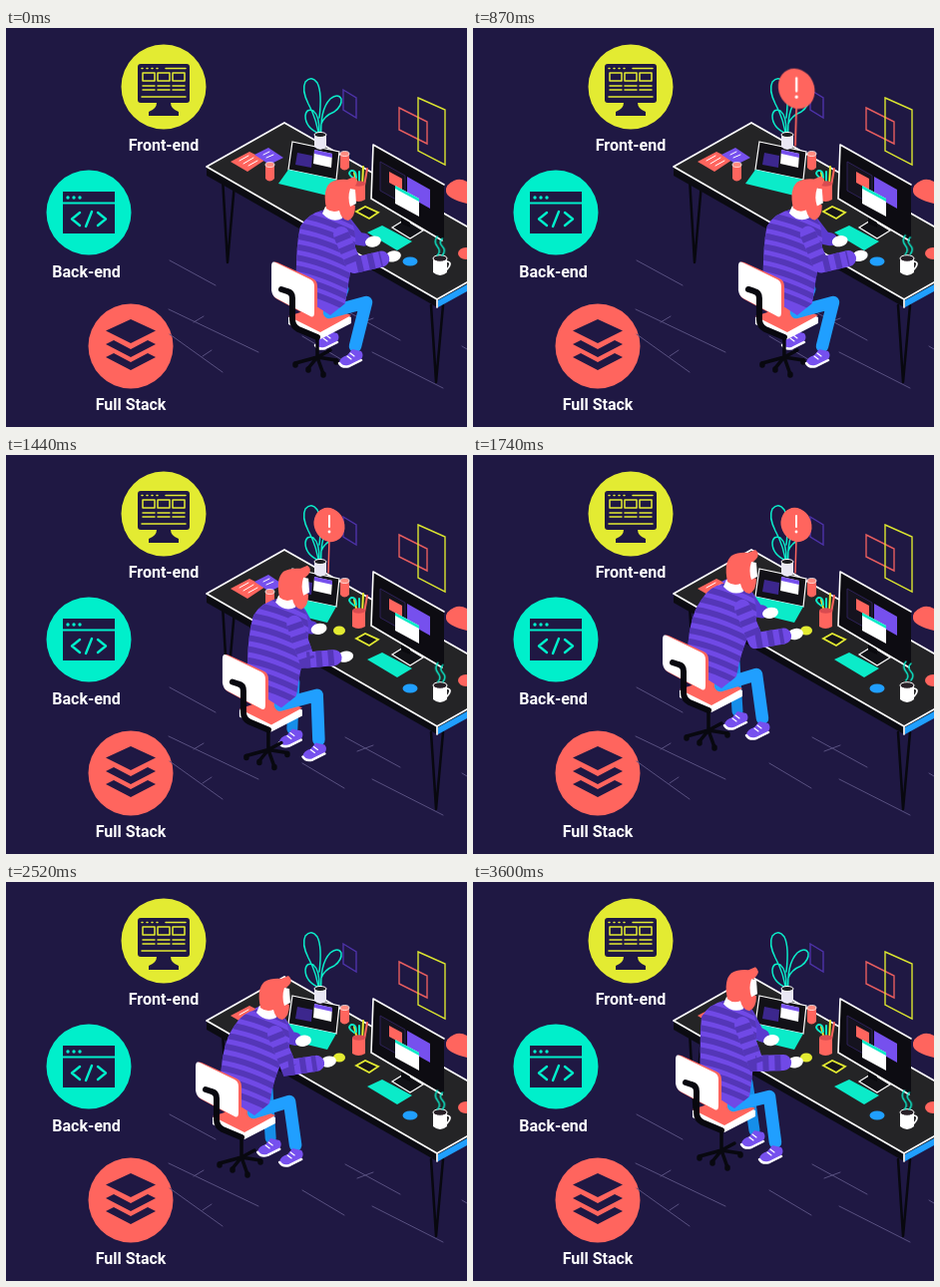
An HTML page for the animation above (3.63 s loop, 462 by 400 pixels).

```html
<!DOCTYPE html>
<html lang="en">
<head>
<meta charset="utf-8">
<title>Developer roles</title>
<style>
html, body { margin: 0; width: 100%; height: 100%; overflow: hidden; background: #1f1843; }
svg { display: block; width: 462px; height: 400px; }
text { font: 700 16px Roboto, Arial, sans-serif; fill: #fff; text-anchor: middle; }
.line { fill: none; stroke-linecap: round; stroke-linejoin: round; }
#alert { transform-origin: 323px 120px; animation: alert 3630ms infinite; }
.steam { animation: sway 605ms ease-in-out infinite alternate; }
@keyframes alert {
  0%, 18% { transform: scale(0); opacity: 1; }
  23% { transform: scale(1.28); }
  28% { transform: scale(.95); }
  32%, 57% { transform: none; opacity: 1; }
  59.5% { opacity: .3; }
  61%, 100% { transform: none; opacity: 0; }
}
@keyframes sway {
  from { transform: translate(-.7px, 1px); }
  to { transform: translate(.8px, -1px); }
}
</style>
</head>
<body>
<svg viewBox="0 0 462 400">
  <defs>
    <clipPath id="torsoClip"><path id="torsoShape"/></clipPath>
    <g id="shoe">
      <path d="M-12 4Q-11-1-4-3L1-9 10-7Q13-3 10 1L-2 8Q-11 10-12 4Z" fill="#7650ee"/>
      <path class="line" d="M-12 5Q-9 10-2 8L10 2" stroke="#fff" stroke-width="2.5"/>
      <path class="line" d="M-4-2l4 3M-1-5l4 3" stroke="#fff" stroke-width="1.2"/>
    </g>
    <ellipse id="hand" rx="8" ry="5.5" fill="#fff" transform="rotate(-12)"/>
  </defs>

  <rect width="462" height="400" fill="#1f1843"/>

  <!-- Role icons -->
  <circle cx="158" cy="59" r="42.5" fill="#e3eb32"/>
  <g fill="#1f1843">
    <rect x="132" y="36" width="52" height="39" rx="3"/>
    <path d="M151 75h14q0 6 8 9v4h-30v-4q8-3 8-9z"/>
  </g>
  <g class="line" stroke="#e3eb32" stroke-width="1.5">
    <path d="M136 40.5h1M141 40.5h1M146 40.5h1M151 40.5h1M160 40.5h20M136 69h44"/>
    <path d="M137 45h12v8h-12zM152 45h12v8h-12zM167 45h12v8h-12zM137 58h12M152 58h12M167 58h12M137 62h12M152 62h12M167 62h12"/>
  </g>
  <circle cx="83" cy="185" r="42.5" fill="#00efcb"/>
  <path d="M57 164h52v42H57z" fill="#1f1843"/>
  <path d="M57 175.5h52" stroke="#00efcb" stroke-width="2"/>
  <g fill="#00efcb"><circle cx="62" cy="170" r="1.7"/><circle cx="68" cy="170" r="1.7"/><circle cx="74" cy="170" r="1.7"/></g>
  <path class="line" d="M74 185l-8 6.5 8 6.5M92 185l8 6.5-8 6.5M86 184l-6 15" stroke="#00efcb" stroke-width="2.4"/>
  <circle cx="125" cy="319" r="42.5" fill="#ff655e"/>
  <g fill="#1f1843">
    <path d="M125 292l25 11.5-25 12.5-25-12.5z"/>
    <path id="layer" d="M100 317l8-4 17 9 17-9 8 4-25 13z"/>
    <use href="#layer" y="13"/>
  </g>
  <text x="158" y="123">Front-end</text>
  <text x="80.5" y="250">Back-end</text>
  <text x="125" y="383">Full Stack</text>

  <!-- Floor and wall -->
  <path class="line" d="M164 233l46 25M163 282l90 43M188 295l10-6M164 307l53 38M197 329l9-6M297 309l42 25M340 283l55 30M352 297l16-6M367 325l71 36M457 319l5 3" stroke="#585080" stroke-width="1"/>
  <g fill="none" stroke-width="1.4">
    <path d="M338 62l13 8v20l-13-8z" stroke="#4d32a8"/>
    <path d="M394 80l28 14v22l-28-14z" stroke="#e65d5e"/>
    <path d="M413 70l27 12v55l-27-14z" stroke="#dbe52f"/>
  </g>
  <path d="M462 154q-7-4-13-1-9 4-8 11 1 7 21 12z" fill="#ff655e"/>

  <!-- Desk -->
  <g class="line" stroke="#08080f" stroke-width="2.5">
    <path d="M217 150l5 85 7-79M426 278l5 77 7-77"/>
  </g>
  <path d="M201 139L279 95 462 199V263L432 280 201 148z" fill="#0b0b12"/>
  <path d="M201 139L279 95 462 199V255L432 272z" fill="#242426"/>
  <path d="M433 273l29-16v7l-29 16z" fill="#209fff"/>
  <path class="line" d="M279 95L201 139 432 272 462 255M279 95l183 104M432 272v8" stroke="#fff" stroke-width="1.7"/>

  <!-- Papers and cans -->
  <path d="M225 134l19-10 16 8-18 12z" fill="#ff655e"/>
  <path d="M249 127l14-7 15 10-14 7z" fill="#7650ee"/>
  <path class="line" d="M234 133l9-5M238 136l10-6M243 138l9-5M258 127l6-3M261 130l7-3" stroke="#fff" stroke-width="1"/>
  <g id="can"><path d="M260 137v14q4 5 9 0v-14z" fill="#ff655e"/><ellipse cx="264.5" cy="137" rx="4.5" ry="2.5" fill="#ff8b80" stroke="#fff" stroke-width=".7"/></g>
  <use href="#can" x="75" y="-11"/>

  <!-- Laptop -->
  <path d="M287 114l47 10-3 28-48-10z" fill="#121117" stroke="#fff" stroke-width="1.2"/>
  <path d="M283 142l48 10-9 16-49-12z" fill="#0bebc9"/>
  <path d="M292 125l15 3-1 12-16-3z" fill="#3c278d"/>
  <path d="M309 122l18 4-1 14-18-4z" fill="#fff"/>
  <path d="M309 122l18 4v4l-18-4z" fill="#7650ee"/>

  <!-- Plant -->
  <path class="line" d="M314 112Q312 92 303 76 296 62 300 54 306 47 312 55 317 65 314 90M316 112Q314 82 325 71 333 65 336 71 337 78 329 84 319 88 316 96M314 106Q300 100 300 88 301 80 308 83 314 88 314 104" stroke="#0bebc9" stroke-width="1.5"/>
  <path d="M309 107v12q6 6 12 0v-12z" fill="#e9e7f4"/><ellipse cx="315" cy="107" rx="6" ry="2.5" fill="#1d1c21" stroke="#fff"/>

  <!-- Monitor -->
  <path d="M387 200l13-8 18 11-13 8z" fill="#111116" stroke="#fff" stroke-width="1.2"/>
  <path d="M396 180h9v20l-9-4z" fill="#09090e"/>
  <path d="M368 117l71 40v56l-73-42z" fill="#0d0c12"/>
  <path class="line" d="M439 157L368 117 366 171 437 213" stroke="#fff" stroke-width="1.6"/>
  <path d="M375 134l25 14v29l-25-14z" fill="#15131f" stroke="#352668" stroke-width=".8"/>
  <path d="M384 144l13 7v11l-13-7z" fill="#ff655e"/>
  <path d="M402 149l23 13v19l-23-13z" fill="#7650ee"/>
  <path d="M390 158l24 13v18l-24-13z" fill="#fff"/>
  <path d="M390 158l24 13v3l-24-13z" fill="#0bebc9"/>

  <!-- Desk items -->
  <path d="M362 205l15-7 30 16-15 9z" fill="#0bebc9"/>
  <path d="M351 184l9-5 13 6-9 6z" fill="#16151a" stroke="#e3eb32" stroke-width="1.8"/>
  <ellipse cx="405" cy="234" rx="7.5" ry="4.5" fill="#209fff"/>
  <ellipse cx="334" cy="176" rx="6" ry="4.5" fill="#e3eb32"/>
  <path class="line" d="M352 158l-3-13M357 158l1-19" stroke="#e3eb32" stroke-width="2"/>
  <path class="line" d="M354 158v-14M349 151q-8-5-3-8 5-1 5 7" stroke="#0bebc9" stroke-width="2"/>
  <path class="line" d="M359 158l3-17" stroke="#ff655e" stroke-width="2"/>
  <path d="M347 156v16q6 4 13 0v-16z" fill="#ff655e"/><ellipse cx="353.5" cy="156" rx="6.5" ry="2.8" fill="#d94b50"/>
  <path d="M428 231v14q7 6 14 0v-14z" fill="#fff"/><ellipse cx="435" cy="231" rx="7" ry="3.3" fill="#282027" stroke="#fff"/>
  <path class="line" d="M442 234q6 1 0 8" stroke="#fff" stroke-width="1.7"/>
  <path class="line steam" d="M433 227q4-4 0-9t0-10M438 227q4-5 0-9t0-8" stroke="#0bebc9" stroke-width="1.5"/>
  <ellipse cx="461" cy="226" rx="8" ry="6" fill="#ff655e"/>

  <g id="alert">
    <path class="line" d="M324 84L323 118" stroke="#ff655e" stroke-width="1.5"/>
    <ellipse cx="324" cy="70" rx="15" ry="17.5" fill="#ff655e" transform="rotate(-25 324 70)"/>
    <path class="line" d="M324 61v11" stroke="#fff" stroke-width="2"/><circle cx="324" cy="77" r="1.4" fill="#fff"/>
  </g>

  <!-- Developer -->
  <path id="legL" class="line" stroke="#168ee9" stroke-width="11"/>
  <use id="shoeL" href="#shoe"/>
  <g id="seat">
    <path class="line" d="M312 304v27M312 330l-22 6M312 330l19 3M312 330l-9 11M312 330l6 17M312 330l13-7" stroke="#08080f" stroke-width="3.5"/>
    <path class="line" d="M290 337v1M331 334v1M303 342v1M318 347v1" stroke="#08080f" stroke-width="5.5"/>
    <path d="M283 290l36-12 27 12v6l-31 16-32-15z" fill="#fff"/>
    <path d="M283 289l36-12 27 11-31 17z" fill="#ff655e"/>
  </g>
  <path id="legR" class="line" stroke="#209fff" stroke-width="12.5"/>
  <use id="shoeR" href="#shoe"/>
  <path id="armL" class="line" stroke="#5b3bd0" stroke-width="13"/>
  <use id="handL" href="#hand"/>
  <use href="#torsoShape" fill="#7049e6"/>
  <g clip-path="url(#torsoClip)"><path id="stripes" fill="none" stroke="#5436b8" stroke-width="6"/></g>
  <g id="head">
    <path d="M1 29L-2 36Q7 46 18 41L17 30z" fill="#fff"/>
    <path d="M2 31Q-2 12 6 5 13 1 23 2L30-1Q35 3 31 8L27 12 26 26 31 28Q31 40 24 43 17 42 15 33 8 36 2 31z" fill="#ff655e"/>
    <path d="M26 11l5 1 1 14-6 3q-3-9 0-18z" fill="#fff"/>
  </g>
  <use id="handR" href="#hand"/>
  <path id="armR" class="line" stroke="#7049e6" stroke-width="16"/>
  <path id="cuffs" fill="none" stroke="#5436b8" stroke-width="16" stroke-dasharray="6 6"/>
  <g id="back">
    <path d="M272 235l35 16q5 2 5 8v28q0 6-5 4l-35-19q-5-3-5-8v-25q0-6 5-4z" fill="#ff655e"/>
    <path d="M270 235l35 17q4 2 4 7v26q0 6-4 4l-34-18q-4-2-5-8v-24q0-6 4-4z" fill="#fff"/>
    <path class="line" d="M276 262l6 2q5 1 5 7v21q0 7 6 10l19 8" stroke="#08080f" stroke-width="6"/>
  </g>
</svg>
<script>
const LOOP = 3630;
const $ = id => document.getElementById(id);
const set = (id, name, value) => $(id).setAttribute(name, value);
const move = (id, p) => set(id, 'transform', `translate(${p})`);
const add = (p, x, y) => [p[0] + x, p[1] + y];
const mix = (a, b, k) => a.map((v, i) => v + (b[i] - v) * k);

// chair, head, left/right hand, right knee, left/right foot
const typing = [[0, 0], [319, 149], [368, 214], [388, 228], [361, 275], [322, 313], [346, 331]];
const push = [[-7, -4], [302, 139], [338, 197], [367, 239], [355, 273], [320, 311], [346, 331]];
const laptop = [[-76, -54], [253, 96], [298, 158], [323, 180], [284, 220], [264, 266], [286, 276]];
const step = [[-75, -54], [251, 95], [299, 158], [323, 180], [285, 218], [279, 260], [298, 272]];
const shift = [[-63, -61], [253, 87], [299, 158], [323, 180], [297, 215], [281, 258], [299, 273]];
const track = [[0, typing], [850, typing], [1200, push], [1620, laptop], [2500, laptop],
  [2800, step], [3260, shift], [LOOP, shift]];

function poseAt(t) {
  const i = track.findIndex(([end]) => t < end);
  const [t0, from] = track[i - 1], [t1, to] = track[i];
  const k = (t - t0) / (t1 - t0), ease = k * k * (3 - 2 * k);
  return from.map((p, j) => mix(p, to[j], ease));
}

function drawArm(id, shoulder, hand, bend, reach) {
  const elbow = add(mix(shoulder, hand, .5), ...bend);
  const d = `M${shoulder}Q${elbow} ${elbow}L${mix(elbow, hand, reach)}`;
  set(id, 'd', d);
  return d;
}

function draw(t) {
  let [chair, head, handL, handR, kneeR, footL, footR] = poseAt(t);
  head = add(head, 0, Math.cos(t / 160));
  handL = add(handL, 0, 1.3 * Math.sin(t / 55));
  handR = add(handR, 0, Math.sin(t / 65 + 2));

  const at = (x, y) => add(chair, x, y);
  const neck = add(head, 5, 32);
  const body = (x, y) => add(neck, x, y);
  const torso = `M${body(-4, 0)}Q${body(-22, 4)} ${body(-29, 17)}Q${at(290, 218)} ${at(291, 266)}`
    + `L${at(325, 288)} ${at(340, 276)}Q${at(344, 248)} ${body(26, 37)}Q${body(28, 15)} ${body(15, 2)}Q${body(5, 9)} ${body(-4, 0)}Z`;
  set('torsoShape', 'd', torso);

  let bands = '';
  for (let i = 0; i < 9; i++) {
    const p = mix(body(-38, -6), at(278, 250), i / 7);
    bands += `M${p}q32 2 76 26`;
  }
  set('stripes', 'd', bands);

  ['seat', 'back'].forEach(id => move(id, chair));
  set('legL', 'd', `M${at(330, 270)}L${at(338, 262)} ${add(footL, 1, -9)}`);
  set('legR', 'd', `M${at(324, 285)}L${kneeR} ${add(footR, 4, -12)}`);
  move('shoeL', footL);
  move('shoeR', footR);
  move('handL', handL);
  move('handR', handR);
  move('head', head);
  drawArm('armL', body(17, 14), handL, [-2, 6], .4);
  set('cuffs', 'd', drawArm('armR', body(12, 25), handR, [-13, 20], .7));
}

const start = performance.now();
function tick() {
  draw((performance.now() - start) % LOOP);
  requestAnimationFrame(tick);
}
tick();
</script>
</body>
</html>
```
